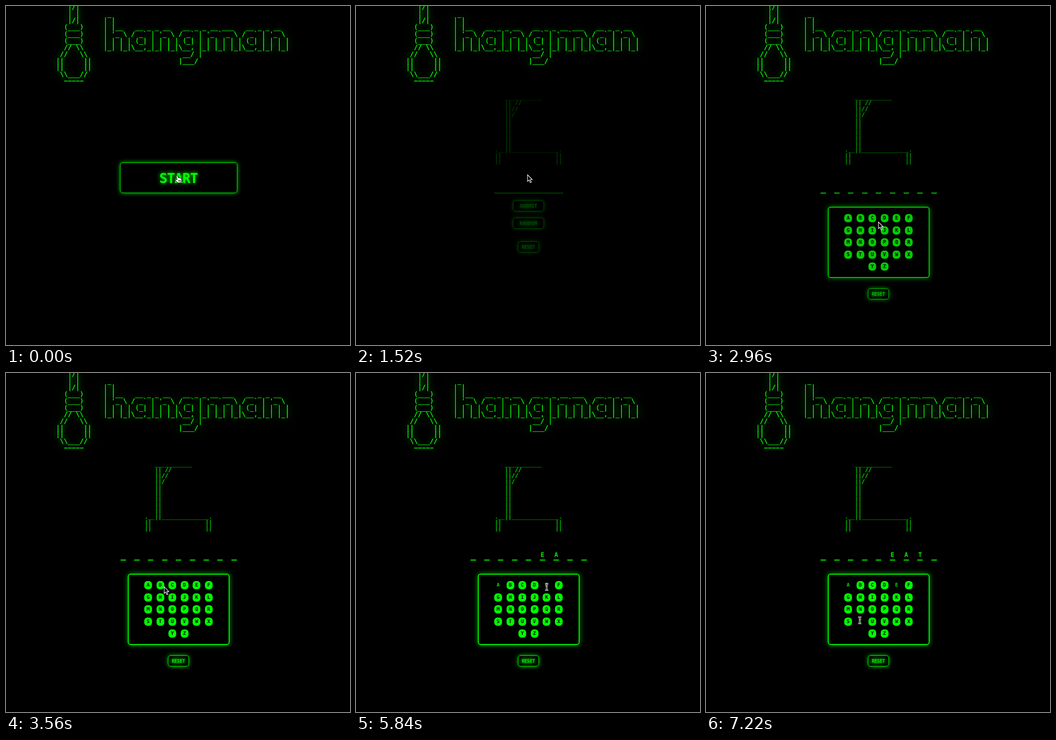
Recreate the animation shown at these times as an HTML page. Size 754 px wide and 743 px high, loop 7.24 s.

```html
<!DOCTYPE html>
<html lang="en">
<head>
<meta charset="utf-8">
<title>hangman</title>
<style>
  html, body { margin: 0; width: 100%; height: 100%; overflow: hidden; background: #000; }
  body { position: relative; color: #0f0; font: 14px "DejaVu Sans Mono", monospace; cursor: none; }
  pre, div, svg { position: absolute; box-sizing: border-box; margin: 0; white-space: pre; }
  pre { font-family: inherit; }
  #logo { left: 109.7px; top: -5px; font-size: 14.4px; line-height: 14.7px; color: #14ff14;
          -webkit-text-stroke: .35px #14ff14; text-shadow: 0 0 20px #0f0, 0 0 24px #0f0a; }
  #gallows { left: 304.1px; top: 193.5px; font-size: 12.27px; line-height: 12.8px; color: #0e0;
             -webkit-text-stroke: .2px #0e0; text-shadow: 0 0 8px #0f06; }
  #scene, #form, #game { left: 0; top: 0; width: 754px; height: 743px; }
  .button { border: 1.5px solid #0f0; border-radius: 6px; background: #000; text-align: center;
            font-weight: bold; box-shadow: 0 0 10px #0f0c; text-shadow: 0 0 10px #0f0; }
  #start { left: 249.5px; top: 343px; width: 257px; height: 67px; line-height: 68px;
           font-size: 30px; letter-spacing: -1.26px; }
  .small { left: 344px; width: 67.5px; height: 24px; line-height: 23px; font-size: 11.3px;
           letter-spacing: -.4px; color: #0e0; box-shadow: 0 0 10px #0f0c;
           text-shadow: 0 0 10px #0f0, 0 0 10px #0f08; }
  #submit { top: 425.5px; }
  #random { top: 463.5px; }
  #reset { left: 354.5px; width: 46.5px; font-size: 10.2px; letter-spacing: -.34px; }
  #field { left: 302.5px; top: 388px; width: 151px; height: 23px; border-bottom: 2px solid #0d0; }
  #panel { left: 266.5px; top: 440px; width: 223px; height: 156px; border: 2px solid #0f0;
           border-radius: 6px; box-shadow: 0 0 12px #0f0a; }
  .slot { top: 387px; width: 12px; height: 24px; line-height: 22px; border-bottom: 2px solid #0f0;
          text-align: center; font-size: 13.5px; font-weight: bold; color: #0e0; }
  .key { width: 17px; height: 18px; line-height: 18px; border-radius: 7px; text-align: center;
         font-size: 11px; font-weight: bold; color: #000; background: #0f0; }
  .key.used { color: #0d0; background: none; }
  #cursor { left: 0; top: 0; width: 1px; height: 1px; overflow: visible; pointer-events: none; }
</style>
</head>
<body>
<pre id="logo">
   |/|
   | |       _
   |/|      | |
  (___)     | |__   __ _ _ __   __ _ _ __ ___   __ _ _ __
  (___)     | '_ \ / _` | '_ \ / _` | '_ ` _ \ / _` | '_ \
  (___)     | | | | (_| | | | | (_| | | | | | | (_| | | | |
  // \\     |_| |_|\__,_|_| |_|\__, |_| |_| |_|\__,_|_| |_|
 //   \\                        __/ |
||     ||                      |___/
||     ||
 \\___//
  −−−−−
</pre>
<div id="start" class="button">START</div>
<div id="scene">
<pre id="gallows">
   ___________
   || //
   ||//
   ||/
   ||
   ||
   ||
   ||
   ||
.__||______________.
||                ||
||                ||
</pre>
<div id="form"><div id="field"></div><div id="submit" class="button small">SUBMIT</div><div id="random" class="button small">RANDOM</div></div>
<div id="game"><div id="panel"></div></div>
<div id="reset" class="button small">RESET</div>
</div>
<svg id="cursor">
  <path id="arrow" d="M0 0V14.5L3.4 11.4 5.8 17 8.3 16 5.9 10.5H10.3Z" fill="#000" stroke="#fff" stroke-width="1.2"/>
  <path id="hand" d="M-3 2.5Q-2 .5-.4 2.3L1.8 6.4Q3.2 5.4 4.2 7 5.6 6.2 6.6 7.8 8.4 7.4 8.8 9.2L9 13 7.5 17.5H.5L-5 11.5Q-4.6 9.5-2.5 10.4L-.8 11ZM2.5 11.5V15M4.5 11.5V15M6.5 11.5V15" fill="#fff" stroke="#000"/>
  <g id="beam" fill="none">
    <path id="stem" d="M-3.5-7Q0-7 0-5V5Q0 7-3.5 7M3.5-7Q0-7 0-5M0 5Q0 7 3.5 7M-2 2H2"/>
  </g>
</svg>
<script>
const LOOP = 7240, START_CLICK = 640, FADE = 2900, RANDOM_CLICK = 2650;
const guesses = [
  { letter: 'A', slot: 6, time: 4150 },
  { letter: 'E', slot: 5, time: 5450 },
  { letter: 'T', slot: 7, time: 6850 },
];
// Each move: start time, end time, target x, target y, sideways bend
const home = [376, 370];
const moves = [
  [1620, 2200, 378, 473.5, 0],
  [3250, 3900, 311, 463, 0],
  [4330, 5100, 418, 469, 15],
  [6000, 6650, 337, 542, 0],
];

const $ = id => document.getElementById(id);
function add(className, left, top, text) {
  const el = document.createElement('div');
  el.className = className;
  el.style.left = left + 'px';
  if (top !== null) el.style.top = top + 'px';
  el.textContent = text;
  $('game').append(el);
  return el;
}

const slots = Array.from({ length: 9 }, (_, i) => add('slot', 250.5 + 30.4 * i, null, ''));
const keys = {};
[...'ABCDEFGHIJKLMNOPQRSTUVWXYZ'].forEach((letter, i) => {
  const row = Math.floor(i / 6), col = i % 6 + (row === 4 ? 2 : 0);
  keys[letter] = add('key', 303 + 26.55 * col, 456 + 26.6 * row, letter);
});

// The text beam is a black stem with a white outline
const outline = $('stem').cloneNode();
outline.removeAttribute('id');
outline.setAttribute('stroke', '#fff');
outline.setAttribute('stroke-width', 3);
$('stem').setAttribute('stroke', '#000');
$('beam').prepend(outline);

const show = (el, on) => { el.style.display = on ? '' : 'none'; };

function cursorAt(t) {
  let [x, y] = home;
  for (const [from, to, nextX, nextY, bend] of moves) {
    const u = Math.min(1, Math.max(0, (t - from) / (to - from)));
    const s = u * u * (3 - 2 * u);
    x += (nextX - x) * s;
    y += (nextY - y) * s + bend * Math.sin(Math.PI * u);
  }
  return [x, y];
}

function cursorKind(x, y) {
  const under = document.elementFromPoint(x, y);
  if (!under) return 'arrow';
  if (under.id === 'field' || under.matches('.used')) return 'beam';
  return under.matches('.button, .key') ? 'hand' : 'arrow';
}

function render(t) {
  const started = t >= START_CLICK, playing = t >= RANDOM_CLICK;
  show($('start'), !started);
  show($('scene'), started);
  show($('form'), !playing);
  show($('game'), playing);
  $('scene').style.opacity = Math.min(1, Math.max(0, (t - START_CLICK) / FADE));
  $('reset').style.top = (playing ? 619 : 515.5) + 'px';
  for (const { letter, slot, time } of guesses) {
    keys[letter].classList.toggle('used', t >= time);
    slots[slot].textContent = t >= time ? letter : '';
  }
  const [x, y] = cursorAt(t), kind = cursorKind(x, y);
  for (const id of ['arrow', 'hand', 'beam']) show($(id), id === kind);
  $('cursor').style.transform = `translate(${x}px, ${y}px)`;
}

const begin = performance.now();
function tick() {
  render((performance.now() - begin) % LOOP);
  requestAnimationFrame(tick);
}
tick();
</script>
</body>
</html>
```
